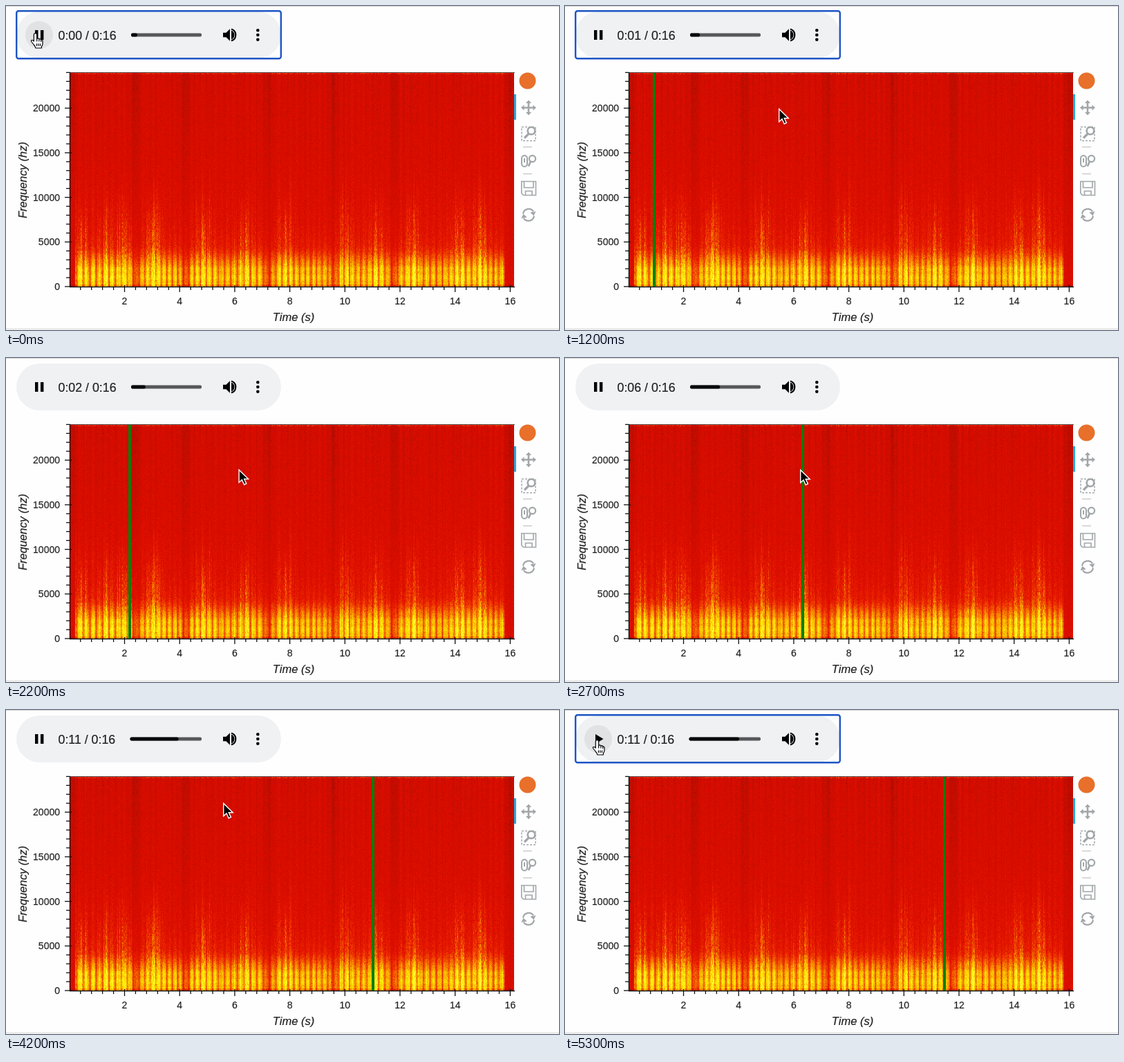
An HTML page with a canvas that plays this animation: 800 by 470 pixels, repeating every 5.4 s.

```html
<!DOCTYPE html>
<html lang="en">
<head>
<meta charset="utf-8">
<title>Spectrogram player</title>
<style>
html, body { margin: 0; width: 100%; height: 100%; overflow: hidden; background: #fefefe; }
canvas { position: absolute; left: 93px; top: 97px; }
svg { position: absolute; left: 0; top: 0; }
text { font-family: "Liberation Sans", Arial, sans-serif; fill: #222; stroke: #222; stroke-width: .2; }
.tick { font-size: 14px; }
.label { font-size: 16.5px; font-style: italic; }
.icon { fill: none; stroke: #a1a6a9; stroke-width: 2; }
.solid { fill: #a1a6a9; stroke: none; }
</style>
</head>
<body>
<canvas id="plot" width="642" height="310"></canvas>
<svg width="800" height="470" viewBox="0 0 800 470">
  <path d="M0 .5H800M0 468.5H800" stroke="#d6d6d6"/>

  <rect x="15" y="8" width="383" height="68" rx="34" fill="#eff1f3"/>
  <rect id="ring" x="15.2" y="7.2" width="382.6" height="69" rx="3" fill="none" stroke="#1d55c4" stroke-width="2.4"/>
  <circle id="hover" cx="48" cy="42" r="20" fill="#e0e2e4"/>
  <path id="pause" d="M42 35h4.4v14H42zM50 35h4.4v14H50z"/>
  <path id="play" d="M44 35v14l11.5-7z"/>
  <text id="clock" x="75.5" y="48.5" font-size="17.8"></text>
  <rect id="track" y="39.5" height="5" rx="2" fill="#55585a"/>
  <rect id="done" y="39.5" height="5" rx="2" fill="#0a0a0a"/>
  <path d="M314 38.7v6.6h4.4l5.5 5.5V33.2l-5.5 5.5z"/>
  <path d="M326 35.5a7 7 0 0 1 0 13" fill="#000"/>
  <path d="M326 33.5a8.9 8.9 0 0 1 0 17" fill="none" stroke="#000" stroke-width="2.2"/>
  <path d="M364.3 35.2v0M364.3 42v0M364.3 48.8v0" stroke="#000" stroke-width="4.6" stroke-linecap="round"/>

  <path d="M92 96.5H736" stroke="#555"/>
  <path d="M92.5 96V408M92 407.5H736" stroke="#111" stroke-width="1.4"/>
  <g id="axes" stroke="#111" stroke-width="1.3"></g>
  <text class="label" text-anchor="middle" x="416" y="457">Time (s)</text>
  <text class="label" text-anchor="middle" transform="translate(30 252.5) rotate(-90)">Frequency (hz)</text>

  <circle cx="754.5" cy="108.5" r="12" fill="#e8702a"/>
  <path d="M736.5 128V165" stroke="#26aae1" stroke-width="3"/>
  <g class="icon">
    <path d="M747 147.5H765M756 138.5V156.5" stroke-width="2.6"/>
    <path class="solid" d="M756 136.5l4 4.6h-8zM756 158.5l4-4.6h-8zM745 147.5l4.6-4v8zM767 147.5l-4.6-4v8z"/>
    <rect x="746" y="175.5" width="20" height="20" stroke-width="1.5" stroke-dasharray="3 2"/>
    <circle cx="760" cy="181" r="5.3" fill="#fefefe" stroke-width="2.6"/>
    <path d="M756 185.5l-6 6" stroke-width="3.2"/>
    <path d="M748 204.5H761M748 243.5H761" stroke="#ccc" stroke-width="1.4"/>
    <rect x="746" y="217" width="8" height="16" rx="4"/>
    <path d="M750 221v6"/>
    <circle cx="761.5" cy="221.5" r="4.6" stroke-width="2.2"/>
    <path d="M759 225.5l-3.2 7" stroke-width="2.8"/>
    <path d="M745.8 254.5H766.5V274.5H748.5L745.8 271.5ZM749.5 255V263.5H763V255M751.5 274V268.5H761V274" stroke-width="1.6"/>
    <path d="M748 301.5a8.2 8.2 0 0 1 15-3.4M764 304.5a8.2 8.2 0 0 1-15 3.4" stroke-width="2.2"/>
    <path class="solid" d="M766.5 298l-3 6.2-5.2-4.6zM745.5 308l3-6.2 5.2 4.6z"/>
  </g>

  <rect id="bar" y="97" width="4" height="310" fill="#0a7d0a"/>
  <path id="arrow" d="M.7 .5V18.8L5 14.9 8.2 22 11.4 20.5 8.2 13.7H14.2Z" stroke="#fff" stroke-width="1.4"/>
  <path id="hand" d="M-2.2 11V1.5Q-2-.3 0-.3Q2.2-.3 2.2 1.5V7.5q1.8-1.3 3.2.5q1.8-.9 2.8.8q2.2-.3 2.3 2v4q0 2-1.6 4v2.2h-8.5q-.4-2.4-2.8-5l-3.5-4.5q-.7-2.2 1.4-2q1 .2 2.3 1.5zM2.2 7.5v4M5.4 8v3.5M8.2 9v3M2 14.5v3.5M4.5 14.5v3.5M7 14.5v3.5" fill="#fff" stroke="#000" stroke-width="1.2" stroke-linejoin="round"/>
</svg>
<script>
const LOOP = 5400, STEP = 100;
const LEFT = 93, X0 = 91.8, PX_PER_S = 39.85;
const $ = id => document.getElementById(id);
const clamp = v => Math.max(0, Math.min(1, v));
const smooth = (a, b, v) => { const k = clamp((v - a) / (b - a)); return k * k * (3 - 2 * k); };

let seed = 20;
function rnd() {
  seed = seed + 0x6D2B79F5 | 0;
  let r = Math.imul(seed ^ seed >>> 15, 1 | seed);
  r ^= r + Math.imul(r ^ r >>> 7, 61 | r);
  return ((r ^ r >>> 14) >>> 0) / 4294967296;
}

// Dark red through orange to yellow
const heat = v => [
  255 - 150 * Math.exp(-4 * v),
  12 + 235 * smooth(.34, 1, v),
  60 * smooth(.85, 1.1, v),
  255
];

// Centres of loud and quiet passages, in stage pixels
const LOUD = [106, 143, 170, 213, 287, 345, 404, 490, 533, 590, 653, 685];
const QUIET = [187, 259, 379, 474, 560];
const near = (list, x, width) => Math.max(...list.map(c => Math.exp(-(((x - c) / width) ** 2))));

function drawSpectrogram() {
  const ctx = $("plot").getContext("2d"), { width: w, height: h } = ctx.canvas;
  const img = ctx.createImageData(w, h);
  for (let i = 0; i < w; i++) {
    const x = i + LEFT;
    const speech = smooth(98, 102, x) * (1 - smooth(720, 722, x));
    const pulse = Math.abs(Math.sin(Math.PI * x / 8.6 + 1.2 * Math.sin(x / 37))) ** .7;
    const quiet = near(QUIET, x, 6);
    const low = speech * (.3 + .7 * pulse) * (1 - .5 * quiet) * (.75 + .3 * rnd());
    const voice = speech * (.2 + .8 * near(LOUD, x, 10)) * (.4 + .6 * pulse) * (.2 + .8 * rnd());
    const stripe = .05 * (rnd() - .5) - .045 * (1 - pulse) - .07 * Math.max(quiet, 1 - speech);
    const reach = .42 + .25 * rnd();
    let fleck = 0;
    for (let j = 0; j < h; j++) {
      const f = 1 - (j + .5) / h;
      if (j % 3 === 0) fleck = .4 + .9 * rnd();
      let v = .385 - .06 * f + stripe * (.3 + f);
      v += .33 * voice * fleck * (1 - smooth(.2, reach, f));
      v += low * (.4 * (1 - smooth(.05, .2, f)) + .08 * (1 - smooth(.1, .3, f)));
      v += .03 * low * Math.cos(f * 150) * (1 - smooth(.08, .14, f));
      v += .11 * (rnd() - .5);
      if (rnd() < .03) v -= .1;
      if (j < 2) v += .25 * rnd();
      if (j > h - 4) v -= .12;
      img.data.set(heat(v), (j * w + i) * 4);
    }
  }
  ctx.putImageData(img, 0, 0);
}

function drawAxes() {
  let out = "";
  const line = (x1, y1, x2, y2) => out += `<path d="M${x1} ${y1}L${x2} ${y2}"/>`;
  const text = (x, y, anchor, s) => out += `<text class="tick" x="${x}" y="${y}" text-anchor="${anchor}">${s}</text>`;
  for (let k = 0; k <= 24; k++) {
    const y = 407 - k * 12.94, major = k % 5 === 0;
    line(major ? 85 : 87, y, major ? 95 : 92, y);
    if (major) text(78, y + 5, "end", k * 1000);
  }
  for (let n = 1; n <= 40; n++) {
    const x = X0 + n * .4 * PX_PER_S, major = n % 5 === 0;
    line(x, major ? 405 : 408, x, major ? 415 : 412);
    if (major) text(x, 433, "middle", n * .4);
  }
  $("axes").innerHTML = out;
}

// Playback starts and seeks: time, x of the play head
const SEEKS = [[460, 92], [2600, 339], [3800, 511]];
const SPEED = .05, STOP_X = 549;
const FOCUS_LOST = 1400, PAUSED = 4800;
// Time, x and y of the pointer tip
const POINTER = [[300, 42.5, 40], [1100, 309, 149], [1200, 309, 149], [1800, 326, 161], [2400, 340, 162],
  [2800, 340, 162], [3300, 532, 171], [3600, 545, 171], [4200, 314, 135], [4800, 46.5, 44]];

function headAt(t) {
  const [from, x] = SEEKS.findLast(s => s[0] <= t) || [t, X0];
  return Math.min(STOP_X, x + SPEED * (t - from));
}

function pointerAt(t) {
  const i = POINTER.findIndex(p => p[0] > t);
  const b = POINTER.at(i), a = i > 0 ? POINTER[i - 1] : b;
  const k = smooth(a[0], b[0] + (a === b), t);
  return [1, 2].map(n => a[n] + (b[n] - a[n]) * k);
}

const show = (id, on) => $(id).style.display = on ? "" : "none";
const set = (id, attrs) => { for (const k in attrs) $(id).setAttribute(k, attrs[k]); };

function render(t) {
  const head = headAt(t), [px, py] = pointerAt(t);
  const secs = Math.max(0, (head - X0) / PX_PER_S), shown = Math.round(secs);
  const over = Math.hypot(px - 48, py - 42) < 20;
  const left = shown === 11 ? 179.5 : 181;

  $("clock").textContent = `0:${String(shown).padStart(2, "0")} / 0:16`;
  set("track", { x: left, width: 283 - left });
  set("done", { x: left, width: 190 + 5.4 * secs - left });
  set("bar", { x: head - 2 });
  show("bar", head > LEFT);
  show("ring", t < FOCUS_LOST || t >= PAUSED);
  show("play", t >= PAUSED);
  show("pause", t < PAUSED);
  show("hover", over);
  show("hand", over);
  show("arrow", !over);
  set(over ? "hand" : "arrow", { transform: `translate(${px} ${py})` });
}

drawSpectrogram();
drawAxes();
const start = performance.now();
function tick() {
  const t = (performance.now() - start) % LOOP;
  render(Math.floor(t / STEP) * STEP);
  requestAnimationFrame(tick);
}
tick();
</script>
</body>
</html>
```
